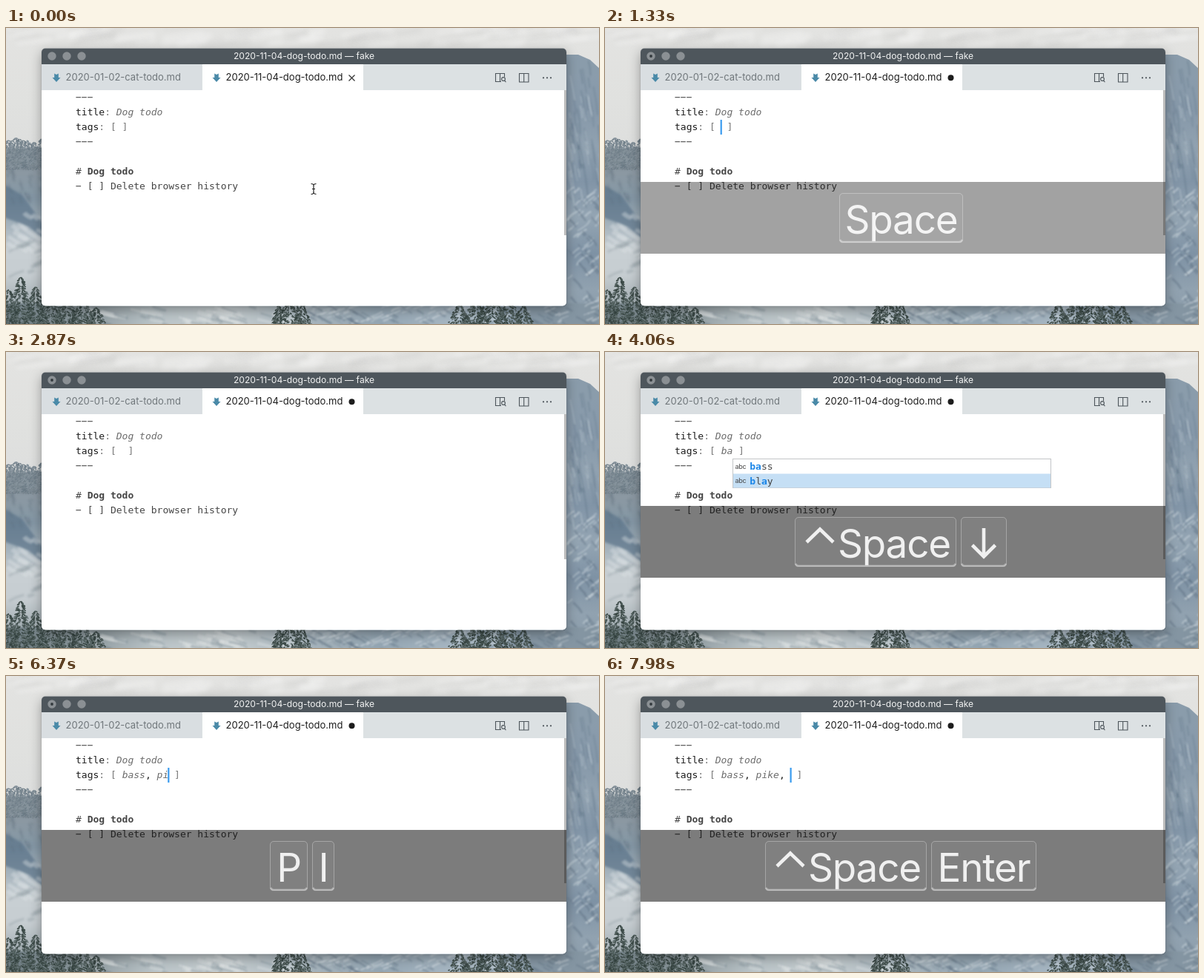
These frames come from a looping animation (800 px wide and 400 px high, 8000 ms). An HTML page with a canvas:

```html
<!DOCTYPE html>
<html lang="en">
<head>
<meta charset="utf-8">
<title>Dog todo</title>
<style>
  html, body { margin: 0; width: 100%; height: 100%; overflow: hidden; background: #e3e3e1; }
  #stage { position: absolute; left: 0; top: 0; width: 800px; height: 400px; overflow: hidden; }
  #stage > * { position: absolute; left: 0; top: 0; }
  #stage > .shadow {
    left: 48px; top: 27.5px; width: 708px; height: 348px; border-radius: 5px;
    box-shadow: 0 5px 16px rgba(0, 0, 0, .34), 0 0 1px rgba(0, 0, 0, .5);
  }
  text { white-space: pre; }
  .ui { font-family: Inter, Roboto, sans-serif; }
  .code { font: 13px "DejaVu Sans Mono", "Liberation Mono", monospace; fill: #454545; }
  .key { fill: #1c1c1c; }
  .dim { fill: #777; }
  .val { fill: #6c6c6c; font-style: italic; }
  .hit { fill: #1b86e8; font-weight: bold; }
  .cap { font: 53px Inter, Roboto, sans-serif; letter-spacing: -1.2px; fill: #f0f0f0; text-anchor: middle; }
  .line { fill: none; stroke: #f0f0f0; stroke-width: 4.6; }
  .icon { fill: none; stroke: #4d555b; stroke-width: 1.1; }
</style>
</head>
<body>
<div id="stage">
  <canvas id="scene" width="800" height="400"></canvas>
  <div class="shadow"></div>
  <svg width="800" height="400" viewBox="0 0 800 400">
    <defs>
      <clipPath id="frame"><rect x="48" y="27.5" width="708" height="348" rx="5"/></clipPath>
      <path id="arrow" d="M-2.8-5.5L0-4L2.8-5.5V0H5.5L0 6L-5.5 0H-2.8Z" fill="#4a8aa8"/>
      <path id="beam" d="M-3.5-7.5q3.5 0 3.5 2.5q0-2.5 3.5-2.5M0-5v9M-3.5 6.5q3.5 0 3.5-2.5q0 2.5 3.5 2.5M-2-.5h4"/>
    </defs>
    <g clip-path="url(#frame)">
      <rect x="48" y="27" width="708" height="349" fill="#fff"/>
      <rect x="48" y="27" width="708" height="22" fill="#4e565c"/>
      <rect x="48" y="49" width="708" height="35" fill="#dce1e3"/>
      <rect x="48" y="49" width="216" height="35" fill="#d9dee1"/>
      <rect x="265" y="49" width="217" height="35" fill="#fff"/>
      <g fill="#8b9094">
        <circle cx="62" cy="38" r="5.7"/><circle cx="82" cy="38" r="5.7"/><circle cx="102" cy="38" r="5.7"/>
      </g>
      <text class="ui" x="402" y="42.3" font-size="12.1" fill="#f1f2f2" text-anchor="middle">2020-11-04-dog-todo.md — fake</text>
      <use href="#arrow" x="68" y="67"/>
      <use href="#arrow" x="284" y="67"/>
      <text class="ui" x="80.5" y="71.4" font-size="13" fill="#70777b">2020-01-02-cat-todo.md</text>
      <text class="ui" x="296.5" y="71.4" font-size="13" fill="#1d1d1d">2020-11-04-dog-todo.md</text>
      <path id="close" d="M462.5 63.5l8 8M470.5 63.5l-8 8" fill="none" stroke="#333" stroke-width="1.2"/>
      <g id="dirty">
        <circle cx="62" cy="38" r="1.9" fill="#33393d"/>
        <circle cx="466.5" cy="67.3" r="4" fill="#1d1d1d"/>
      </g>
      <g class="icon">
        <path d="M668 72.5H660.5V61.5H672.5V66M666.5 61.5V72.5"/>
        <circle cx="671" cy="69" r="2.4"/><path d="M672.4 70.8l2 2.4"/>
        <path d="M692.5 61.5h12.5v11.5h-12.5zM698.7 61.5v11.5"/>
      </g>
      <g fill="#4d555b">
        <circle cx="725" cy="67.3" r="1.15"/><circle cx="730" cy="67.3" r="1.15"/><circle cx="735" cy="67.3" r="1.15"/>
      </g>
      <g class="code">
        <text x="94" y="98">−−−</text>
        <text x="94" y="118"><tspan class="key">title</tspan><tspan class="dim">: </tspan><tspan class="val">Dog todo</tspan></text>
        <text id="tags" x="94" y="138"></text>
        <text x="94" y="158">−−−</text>
        <text x="94" y="198"># <tspan font-weight="bold">Dog todo</tspan></text>
        <text x="94" y="218">− [ ] Delete browser history</text>
      </g>
      <rect id="caret" y="124" width="2.2" height="20" fill="#3a9bef"/>
      <rect x="753" y="84" width="3" height="196" fill="#bcbcbc"/>
      <g id="popup"></g>
      <g id="bar">
        <rect x="48" y="208" width="708" height="97" fill="#000" fill-opacity=".515"/>
        <g id="caps"></g>
      </g>
    </g>
    <g id="mouse" fill="none">
      <use href="#beam" stroke="#fff" stroke-width="3"/>
      <use href="#beam" stroke="#222" stroke-width="1.2"/>
    </g>
  </svg>
</div>
<script>
const LOOP = 8000, RISE = 100, HOLD = 640, FADE = 180, BLINK = 500, CHAR = 7.826, LEFT = 94;
const $ = id => document.getElementById(id);
const clamp = v => Math.max(0, Math.min(1, v));

// time, tag text before the caret, keys shown, popup words, selected row
const BA = ['[ba]ss', '[b]l[a]y'], PI = ['[pi]ke'];
const CLICK = 850;
const steps = [
  [0, '[', ''],
  [1260, '[ ', 'Space'],
  [3150, '[ b', 'B'],
  [3430, '[ ba', 'B A'],
  [3700, '[ ba', '^Space', BA, 0],
  [3980, '[ ba', '^Space ↓', BA, 1],
  [4410, '[ ba', '^Space ↓ ↑', BA, 0],
  [4890, '[ bass, ', '^Space ↓ ↑ Enter'],
  [6090, '[ bass, p', 'P'],
  [6300, '[ bass, pi', 'P I'],
  [6930, '[ bass, pi', '^Space', PI, 0],
  [7530, '[ bass, pike, ', '^Space Enter']
];
const widths = { Space: 167, '^Space': 218, '↓': 62, '↑': 62, Enter: 142, P: 51, I: 30, B: 52, A: 54 };

function tagLine(before) {
  const body = (before + ' ]').replace(/[a-z]+|,/g, m =>
    `<tspan class="${m === ',' ? 'key' : 'val'}">${m}</tspan>`);
  return `<tspan class="key">tags</tspan><tspan class="dim">: ${body}</tspan>`;
}

function capArt(key, x, w) {
  const mid = x + w / 2;
  if (key === '↓') return `<path class="line" d="M${mid} 238V276M${mid - 15.5} 261L${mid} 276.5L${mid + 15.5} 261"/>`;
  if (key === '↑') return `<path class="line" d="M${mid} 278V240M${mid - 15.5} 255L${mid} 239.5L${mid + 15.5} 255"/>`;
  if (key === '^Space') return `<path class="line" d="M${x + 16} 257L${x + 34} 239.5L${x + 52} 257"/>`
    + `<text class="cap" x="${x + 134}" y="278">Space</text>`;
  return `<text class="cap" x="${mid}" y="278">${key}</text>`;
}

function capRow(keys) {
  const list = keys.split(' ').filter(Boolean);
  const total = list.reduce((sum, k) => sum + widths[k] + 6, -6);
  let x = Math.round(399.2 - total / 2), out = '';
  for (const k of list) {
    const w = widths[k];
    out += `<rect x="${x + .5}" y="223.5" width="${w - 1}" height="66" rx="4.5" fill="#fff" fill-opacity=".03" stroke="#fff" stroke-opacity=".3"/>`
      + `<path d="M${x + 1} 286q1 3 4 3H${x + w - 5}q3 0 4-3" fill="none" stroke="#fff" stroke-opacity=".36" stroke-width="2.6"/>`
      + capArt(k, x, w);
    x += w + 6;
  }
  return out;
}

function popupArt(words, pick, x) {
  if (!words) return '';
  const left = Math.round(x);
  let out = `<rect x="${left + .5}" y="144.5" width="429" height="${words.length * 19.5}" fill="#fff" stroke="#c3c5c7"/>`;
  words.forEach((word, i) => {
    const y = 145 + i * 19.5;
    const parts = word.replace(/\[(.+?)\]/g, '<tspan class="hit">$1</tspan>');
    if (i === pick) out += `<rect x="${left + 1}" y="${y}" width="428" height="19" fill="#c5dff5"/>`;
    out += `<text class="ui" x="${left + 3.5}" y="${y + 12.5}" font-size="9" letter-spacing="-.3" fill="#444">abc</text>`
      + `<text class="code" x="${left + 23.3}" y="${y + 14}">${parts}</text>`;
  });
  return out;
}

const fade = (step, t) => step && step[2] ? clamp(1 - (t - step[0] - HOLD) / FADE) : 0;

let shown = -1;
function draw(t) {
  let n = steps.length - 1;
  while (steps[n][0] > t) n--;
  const [at, before, keys, words, pick] = steps[n];
  const x = LEFT + CHAR * (6 + before.length);
  if (n !== shown) {
    shown = n;
    $('tags').innerHTML = tagLine(before);
    $('caps').innerHTML = capRow(keys);
    $('popup').innerHTML = popupArt(words, pick, x);
    $('caret').setAttribute('x', x - 1);
    $('close').style.display = $('mouse').style.display = n ? 'none' : '';
    $('dirty').style.display = n ? '' : 'none';
  }
  const p = clamp((t - 250) / 500), ease = p * p * (3 - 2 * p);
  $('mouse').setAttribute('transform', `translate(${415 - 265 * ease} ${218 - 84 * ease})`);

  const typed = n ? steps.find(s => s[1] === before)[0] : CLICK;
  $('caret').style.opacity = t >= typed && Math.floor((t - typed) / BLINK) % 2 === 0 ? 1 : 0;

  const rise = Math.max(clamp((t - at) / RISE), fade(steps[n - 1], at));
  $('bar').style.opacity = rise * fade(steps[n], t);
}

// Mountain backdrop
const g = $('scene').getContext('2d');
let seed = 11;
const rnd = () => (seed = (seed * 16807) % 2147483647) / 2147483647;
const blur = r => g.filter = r ? `blur(${r}px)` : 'none';

function wash(x, y, w, h, across, stops) {
  const grad = across ? g.createLinearGradient(x, 0, x + w, 0) : g.createLinearGradient(0, y, 0, y + h);
  stops.forEach((c, i) => grad.addColorStop(i / (stops.length - 1), c));
  g.fillStyle = grad;
  g.fillRect(x, y, w, h);
}

function streaks(x, y, w, h, n, color, dx, dy, width = 1) {
  g.strokeStyle = color;
  for (let i = 0; i < n; i++) {
    const a = x + rnd() * w, b = y + rnd() * h, k = .3 + rnd();
    g.lineWidth = width * (.5 + rnd());
    g.beginPath();
    g.moveTo(a, b);
    g.quadraticCurveTo(a + dx * k * rnd(), b + dy * k * .5, a + dx * k, b + dy * k);
    g.stroke();
  }
}

function shape(color, ...pts) {
  g.fillStyle = color;
  g.beginPath();
  for (let i = 0; i < pts.length; i += 2) g.lineTo(pts[i], pts[i + 1]);
  g.fill();
}

// A cone of short drooping dabs
function pine(x, top, base, half, tones) {
  g.lineWidth = 1.5;
  for (let y = top; y < base; y += 1.5) {
    const w = half * Math.pow((y - top) / (base - top), .8) + .5;
    for (let i = 0; i < 2 + w / 2.2; i++) {
      const a = x + (rnd() * 2 - 1) * w, side = a < x ? -1 : 1;
      g.strokeStyle = tones[Math.floor(rnd() * tones.length)];
      g.beginPath();
      g.moveTo(a, y);
      g.lineTo(a + side * (1 + rnd() * 2.5), y + 1 + rnd() * 1.5);
      g.stroke();
    }
  }
}

function scene() {
  wash(0, 0, 800, 400, false, ['#e3e3e1', '#e0e1df', '#dcdddd', '#d0d4d6', '#b9c2c7']);
  blur(3);
  streaks(0, 0, 800, 28, 40, 'rgba(255,255,255,.3)', 60, -8, 5);
  streaks(0, 0, 800, 28, 30, 'rgba(160,162,160,.14)', 50, -9, 4);

  // left slope and mist
  blur(1.5);
  wash(-8, 162, 68, 240, false, ['#7b8892', '#8b98a2', '#8497a5', '#a3b1bb', '#c8cfd3', '#c6cdd1', '#a8b2b7', '#808b90']);
  blur(.5);
  for (let x = -2; x < 60; x += 5) pine(x, 148 + rnd() * 14, 190, 5, ['#707f89', '#7d8a93', '#87949d']);
  blur(1.5);
  shape('rgba(92,116,137,.7)', -8, 208, 22, 226, 48, 262, 60, 292, 30, 268, -8, 254);
  streaks(0, 180, 55, 50, 26, 'rgba(85,102,116,.3)', 4, 10, 2);
  streaks(0, 235, 55, 60, 14, 'rgba(225,230,232,.4)', 22, 14, 5);
  streaks(0, 290, 55, 50, 14, 'rgba(110,126,136,.25)', 18, -8, 4);

  // dome on the right
  blur(.6);
  shape('#8a9cab', 738, 42, 756, 36, 772, 36, 788, 43, 802, 56, 802, 402, 738, 402);
  g.globalAlpha = .7;
  wash(750, 62, 52, 340, false, ['#8a9cab', '#8396a7', '#92a3b1', '#7d91a4', '#98a9b6', '#788da0', '#93a4b1', '#8799a6']);
  g.globalAlpha = 1;
  blur(1);
  streaks(754, 44, 46, 160, 34, 'rgba(80,103,124,.26)', 5, 34, 1.8);
  streaks(754, 60, 46, 170, 28, 'rgba(205,215,222,.28)', 5, 26, 1.8);
  streaks(754, 220, 46, 170, 40, 'rgba(218,226,231,.42)', 14, -12, 2);
  streaks(754, 220, 46, 170, 34, 'rgba(75,94,111,.32)', 10, 12, 2);

  // foot of the valley
  wash(0, 372, 800, 30, true, ['#6c7a80', '#8a969b', '#bac4c8', '#c5cdd0', '#a9b6be', '#94a6b3', '#a6b6c2', '#8798a5', '#8394a1']);
  streaks(110, 374, 250, 28, 26, 'rgba(235,238,239,.3)', 30, 8, 4);
  streaks(110, 374, 250, 28, 20, 'rgba(105,122,132,.28)', 24, 8, 3);
  streaks(400, 374, 400, 28, 90, 'rgba(226,233,237,.45)', 16, -7, 2);
  streaks(400, 374, 400, 28, 70, 'rgba(80,101,117,.32)', 14, 8, 2);

  blur(0);
  const tones = ['#34423f', '#3f4d4a', '#4d5b59', '#5f6d6d'];
  for (const [x, top, half] of [[4, 354, 15], [20, 337, 19], [40, 350, 17], [60, 358, 19], [82, 362, 20], [104, 366, 19], [122, 378, 14],
    [368, 376, 11], [383, 358, 21], [400, 374, 13], [612, 373, 17], [634, 366, 20], [655, 358, 24], [678, 366, 20], [698, 376, 15]]) {
    pine(x, top, 406, half, tones);
  }
}

scene();
const start = performance.now();
(function tick() {
  draw((performance.now() - start) % LOOP);
  requestAnimationFrame(tick);
})();
</script>
</body>
</html>
```
